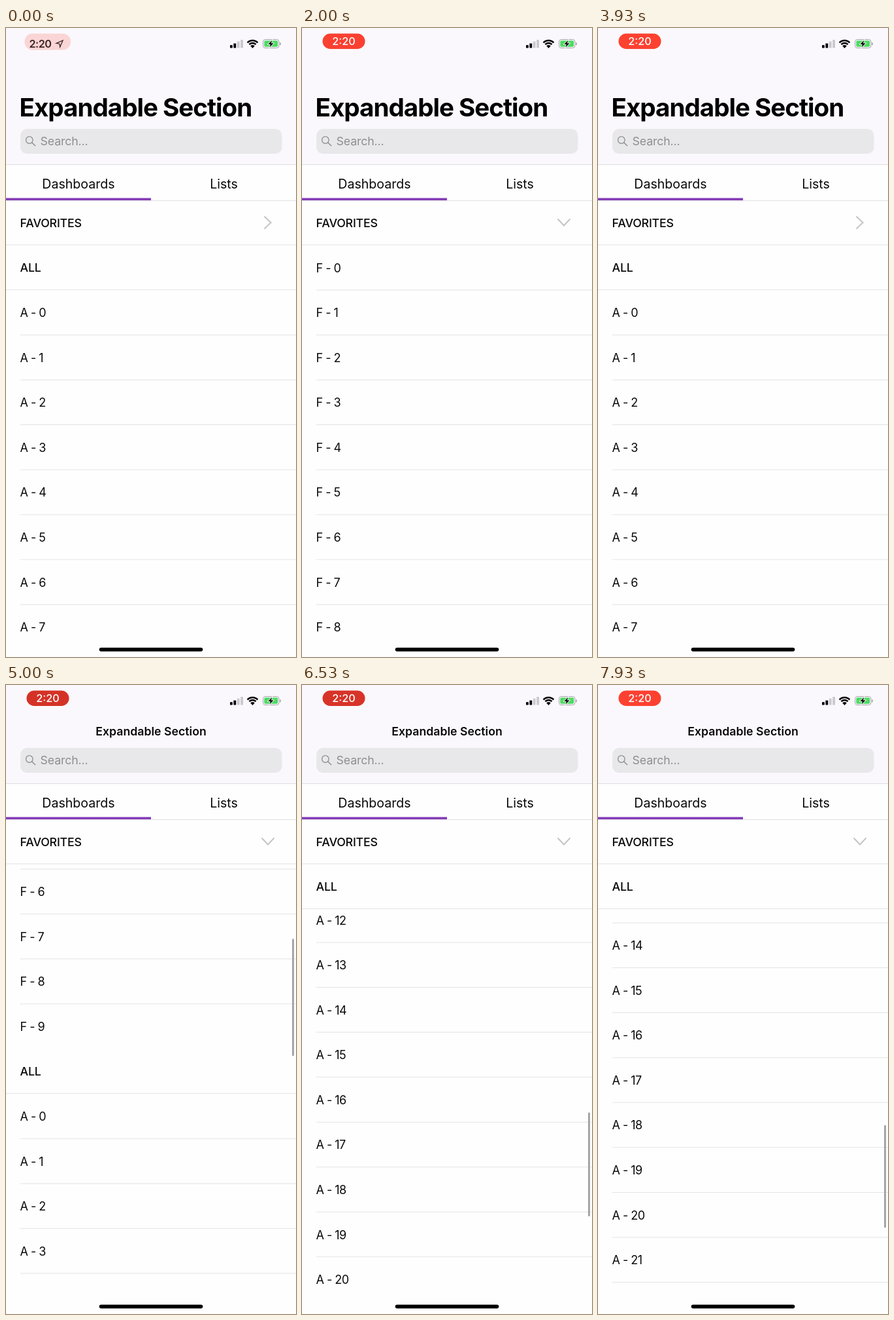
Recreate the animation shown at these times as an HTML page with a canvas. Size 444 px wide and 960 px high, loop 8 s.

```html
<!DOCTYPE html>
<html lang="en">
<head>
<meta charset="utf-8">
<title>Expandable Section</title>
<style>
  html, body { margin: 0; width: 100%; height: 100%; overflow: hidden; background: #fefefe; }
  canvas { display: block; }
</style>
</head>
<body>
<canvas id="stage" width="444" height="960"></canvas>
<script>
const ctx = document.getElementById('stage').getContext('2d');
const LOOP = 8000, W = 444, H = 960;
const ROW = 68.57, FIRST = 366, LIST_END = 924, FAVORITES = 10, ALL = 30;
const PAPER = '#fefefe', BAR = '#faf8fc', INK = '#09090b', RULE = '#e4e4e6';

const clamp = (x, lo = 0, hi = 1) => Math.min(hi, Math.max(lo, x));
const mix = (a, b, k) => a + (b - a) * k;
const ramp = (t, start, length) => clamp((t - start) / length);
const ease = k => k * k * (3 - 2 * k);

function hermite(t, t0, t1, p0, p1, v0, v1) {
  const d = t1 - t0, k = (t - t0) / d, j = 1 - k;
  return p0 * (1 + 2 * k) * j * j + v0 * d * k * j * j
       + p1 * k * k * (3 - 2 * k) - v1 * d * k * k * j;
}

// Two swipes, then the usual exponential slow-down with a 500 ms time constant.
const SCROLL_START = 4500;
function scrollAt(t) {
  if (t < SCROLL_START) return 0;
  if (t < 5000) return hermite(t, SCROLL_START, 5000, 0, 461, 0.2, 0.8);
  if (t < 5600) return hermite(t, 5000, 5600, 461, 1014, 0.8, 1.35);
  return 1689 - 675 * Math.exp((5600 - t) / 500);
}

const openness = t =>
  ease(ramp(t, 1400, 300)) - ease(ramp(t, 3050, 300)) + ease(ramp(t, 4100, 300));

function box(x, y, w, h, color, radius = 0) {
  ctx.fillStyle = color;
  ctx.beginPath();
  ctx.roundRect(x, y, w, h, radius);
  ctx.fill();
}

// y is the middle of the capital letters
function label(str, x, y, size, { weight = 400, color = INK, align = 'left', spacing = 0 } = {}) {
  ctx.font = `${weight} ${size}px Inter, "Open Sans", sans-serif`;
  ctx.letterSpacing = spacing + 'px';
  ctx.textAlign = align;
  ctx.fillStyle = color;
  ctx.fillText(str, x, y + size * 0.364);
}

function line(points, color, width, close = false) {
  ctx.beginPath();
  points.forEach(([x, y]) => ctx.lineTo(x, y));
  if (close) ctx.closePath();
  ctx.strokeStyle = color;
  ctx.lineWidth = width;
  ctx.stroke();
}

function faded(alpha, draw) {
  if (alpha <= 0) return;
  ctx.save();
  ctx.globalAlpha *= alpha;
  draw();
  ctx.restore();
}

function clipped(y, bottom, draw) {
  ctx.save();
  ctx.beginPath();
  ctx.rect(0, y, W, bottom - y);
  ctx.clip();
  draw();
  ctx.restore();
}

function rows(prefix, count, firstY, lastRule) {
  for (let i = 0; i < count; i++) {
    const y = firstY + i * ROW;
    if (y < 100 || y > H + ROW) continue;
    label(`${prefix} - ${i}`, 21.6, y, 18, { spacing: -0.55 });
    if (i < count - 1 || lastRule) box(22, y + 33.4, W - 22, 1, RULE);
  }
}

function sectionHeader(title, y) {
  box(0, y - 34, W, 68, PAPER);
  label(title, 21.6, y, 17.8, { weight: 500, spacing: -0.2 });
  box(0, y + 33, W, 1, RULE);
}

function chevron(y, open) {
  ctx.save();
  ctx.translate(401, y - 0.5);
  ctx.rotate(open * Math.PI / 2);
  line([[-5.5, -9.5], [4.5, 0], [-5.5, 9.5]], '#c5c5c9', 2.1);
  ctx.restore();
}

function list(scroll, open, shift) {
  const allNatural = FIRST + FAVORITES * ROW * open - scroll;
  const allY = Math.max(FIRST - shift, allNatural);
  clipped(264 - shift, LIST_END, () => {
    faded(open, () => rows('F', FAVORITES, FIRST - scroll, false));
    box(0, allY - 34, W, H, PAPER);
    rows('A', ALL, allNatural + ROW, true);
    sectionHeader('ALL', allY);
    sectionHeader('FAVORITES', 297.5 - shift);
    chevron(297.5 - shift, open);
  });
}

function scrollBar(t, scroll) {
  const u = scroll - 461;
  faded(ramp(t, SCROLL_START, 120), () =>
    box(438, 387 + 0.2732 * u - 3.3e-5 * u * u, 3, 179 - 0.018 * u, '#a5a5a7', 1.5));
}

function navigation(shift) {
  box(0, 0, W, 208 - shift, BAR);
  clipped(94, H, () =>
    label('Expandable Section', 20.5, 121.2 - shift, 38.6, { weight: 700, color: '#000', spacing: -1 }));
  faded(ramp(shift, 44, 14), () =>
    label('Expandable Section', 222, 71, 17.7, { weight: 600, align: 'center' }));

  box(22, 154 - shift, 400.5, 38, '#e8e8ea', 10);
  ctx.beginPath();
  ctx.arc(35.8, 171 - shift, 5.3, 0, 7);
  ctx.strokeStyle = '#8c8c91';
  ctx.lineWidth = 1.3;
  ctx.stroke();
  line([[39.6, 174.8 - shift], [45, 180 - shift]], '#8c8c91', 1.5);
  label('Search...', 52.5, 172.6 - shift, 17.8, { color: '#8e8e93', spacing: -0.15 });

  box(0, 208 - shift, W, 56, PAPER);
  box(0, 208 - shift, W, 1, '#dddde0');
  label('Dashboards', 111, 237.8 - shift, 19.6, { align: 'center' });
  label('Lists', 333.5, 237.8 - shift, 19.6, { align: 'center' });
  box(0, 263 - shift, W, 1, '#e2e2e5');
  box(0, 259.6 - shift, 222, 3.3, '#843cb8');
}

function clock(t) {
  const k = ease(ramp(t, 0, 350));
  const pulse = 0.5 + 0.5 * Math.cos((t - 1800) / 1000 * Math.PI);
  const red = `rgb(${mix(208, 255, pulse)},${mix(48, 66, pulse)},${mix(38, 50, pulse)})`;
  faded(mix(0.2, 1, k), () =>
    box(mix(28.5, 31.5, k), 8.5, mix(70.5, 65, k), mix(25, 23.5, k), k < 1 ? '#fa4638' : red, 12));
  faded(1 - k, () => {
    label('2:20', 35.5, 24.5, 16.2, { weight: 600, color: '#3d2527', spacing: -0.5 });
    line([[77, 23.3], [87, 19], [82.7, 29], [81.8, 24.2]], '#3d2527', 1.3, true);
  });
  faded(k, () => label('2:20', 64, 20.5, 16.3, { weight: 500, color: '#fff', align: 'center' }));
}

function statusIcons() {
  [4.5, 7, 10, 12.5].forEach((h, i) =>
    box(343 + i * 5.4, 30.5 - h, 3.8, h, i < 2 ? '#000' : '#c9c8cc', 0.8));

  for (const r of [11.2, 7.2]) {
    ctx.beginPath();
    ctx.arc(377.5, 30.2, r, -Math.PI * 0.75, -Math.PI * 0.25);
    ctx.strokeStyle = '#000';
    ctx.lineWidth = 2.4;
    ctx.stroke();
  }
  ctx.fillStyle = '#000';
  ctx.beginPath();
  ctx.moveTo(377.5, 31);
  ctx.arc(377.5, 30.6, 4.6, -Math.PI * 0.75, -Math.PI * 0.25);
  ctx.fill();

  ctx.beginPath();
  ctx.roundRect(393.5, 17.5, 24.5, 13, 3.6);
  ctx.strokeStyle = '#a5a5a9';
  ctx.lineWidth = 1;
  ctx.stroke();
  box(419.2, 22, 1.6, 4.4, '#a5a5a9', 1);
  box(395.3, 19.3, 20.9, 9.4, '#50d965', 2);
  const bolt = [[407.2, 18.8], [401.3, 24.7], [404.8, 24.7], [403.6, 29.4], [409.6, 23.3], [406, 23.3]];
  line(bolt, '#fff', 1.6, true);
  ctx.fillStyle = '#000';
  ctx.fill();
}

function render(t) {
  const scroll = scrollAt(t), shift = Math.min(scroll, 58);
  box(0, 0, W, H, PAPER);
  list(scroll, openness(t), shift);
  scrollBar(t, scroll);
  navigation(shift);
  clock(t);
  statusIcons();
  box(142.7, 945.7, 158.6, 5.7, '#000', 2.85);
}

const start = performance.now();
function tick() {
  render((performance.now() - start) % LOOP);
  requestAnimationFrame(tick);
}
tick();
</script>
</body>
</html>
```
